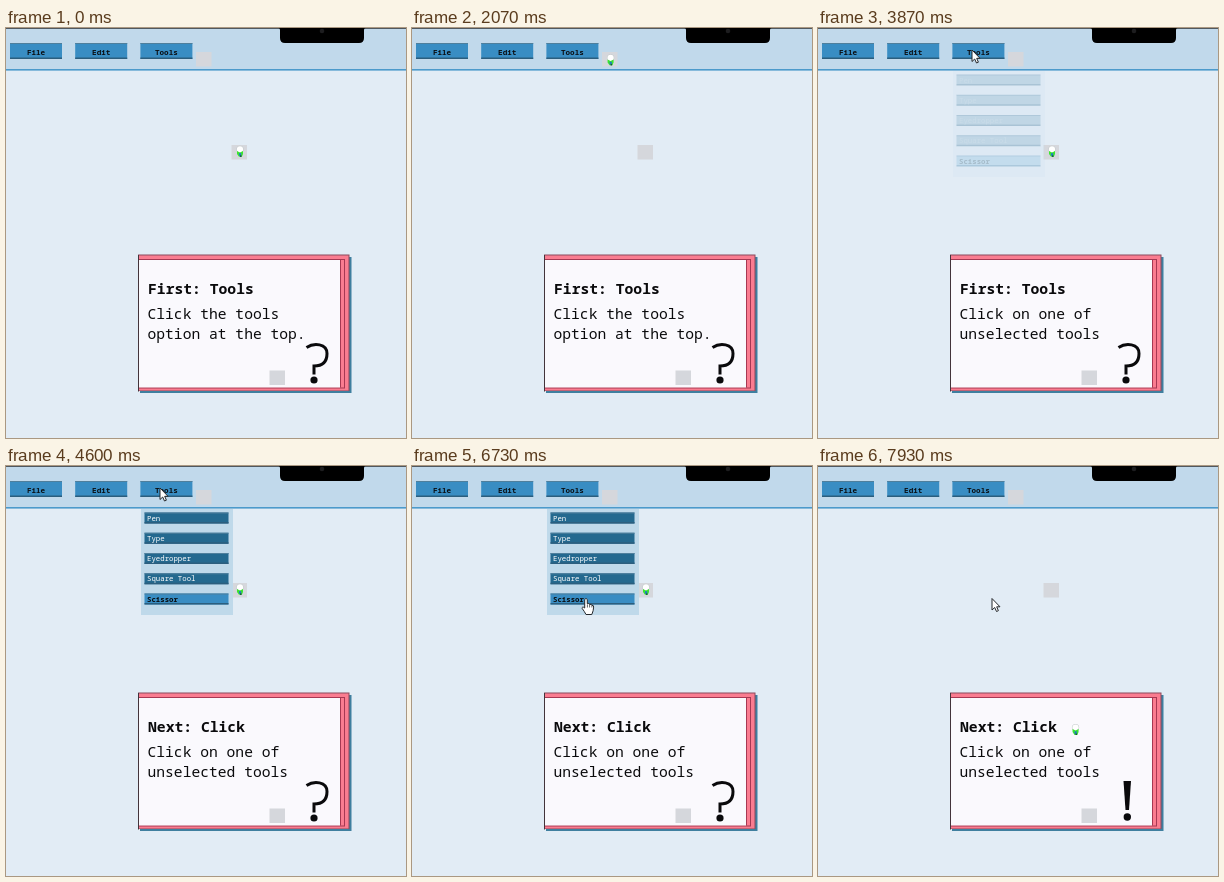
An HTML page with a canvas for the animation above (8000 ms loop, 400 px wide and 410 px high).

```html
<!DOCTYPE html>
<html lang="en">
<head>
<meta charset="utf-8">
<title>Tools tutorial</title>
<style>
html, body { margin: 0; width: 100%; height: 100%; overflow: hidden; background: #e2ecf5; }
canvas { display: block; width: 400px; height: 410px; }
</style>
</head>
<body>
<canvas id="stage"></canvas>
<script>
const W = 400, H = 410, LOOP = 8000;
const MONO = '"Noto Sans Mono", "DejaVu Sans Mono", monospace';
const canvas = document.getElementById('stage');
const ctx = canvas.getContext('2d');
const dpr = window.devicePixelRatio || 1;
canvas.width = W * dpr;
canvas.height = H * dpr;

// Key moments in ms
const T = {
  carry: 340, carried: 2100, enter: 2670, atTools: 3400,
  openClick: 3600, fadeIn: 3740, opened: 4270, title: 4130,
  leave: 5300, atScissor: 6250, pick: 6840, closed: 7300
};
const TOOLS = ['Pen', 'Type', 'Eyedropper', 'Square Tool', 'Scissor'];
const HOME = [234, 124], BUTTON_SLOT = [198, 31], DIALOG_SLOT = [272, 350];

const clamp = v => Math.max(0, Math.min(1, v));
const progress = (t, a, b) => clamp((t - a) / (b - a));
const smooth = u => u * u * (3 - 2 * u);
const mix = (p, q, u) => p.map((v, i) => v + (q[i] - v) * u);

function rect(x, y, w, h, color) {
  ctx.fillStyle = color;
  ctx.fillRect(x, y, w, h);
}

function text(str, x, y, size, color, weight = 400, align = 'left') {
  ctx.font = `${weight} ${size}px ${MONO}`;
  ctx.textAlign = align;
  ctx.fillStyle = color;
  ctx.fillText(str, x, y);
}

function dot(x, y, r, color) {
  ctx.fillStyle = color;
  ctx.beginPath();
  ctx.arc(x, y, r, 0, Math.PI * 2);
  ctx.fill();
}

function bar(x, y, w, h, color) {
  rect(x, y, w, h, color);
  rect(x, y, w, 1, '#4f7f9c');
  rect(x, y + h - 1.5, w, 1.5, '#2b5e7e');
}

function header() {
  rect(0, 0, W, 41, '#c1d9eb');
  rect(0, 0, W, 1, '#50585f');
  rect(0, 41, W, 1.6, '#4c9acb');
  ['File', 'Edit', 'Tools'].forEach((name, i) => {
    const x = 4 + i * 65.2;
    bar(x, 15, 52, 16, '#398dc3');
    text(name, x + 26, 26.6, 7.6, '#0b1015', 700, 'center');
  });
  ctx.fillStyle = '#000';
  ctx.beginPath();
  ctx.moveTo(272.5, 0);
  ctx.quadraticCurveTo(274, 0, 274, 2);
  ctx.lineTo(274, 10);
  ctx.quadraticCurveTo(274, 15, 279, 15);
  ctx.lineTo(353, 15);
  ctx.quadraticCurveTo(358, 15, 358, 10);
  ctx.lineTo(358, 2);
  ctx.quadraticCurveTo(358, 0, 359.5, 0);
  ctx.fill();
  dot(316, 3, 2.3, '#1d1d1f');
}

function slots() {
  rect(190, 24, 15.5, 14.5, '#d5d7dc');
  rect(225.5, 117, 15.5, 14.5, '#d5d7dc');
}

function menu(alpha) {
  if (alpha <= 0) return;
  ctx.globalAlpha = alpha;
  rect(135, 43, 92, 106, '#bfd9ea');
  TOOLS.forEach((name, i) => {
    const y = 46.5 + i * 20.25;
    const open = i === TOOLS.length - 1;
    bar(138.5, y, 84, 11, open ? '#398dc3' : '#24698f');
    text(name, 141, y + 8.1, 7.35, open ? '#080b0e' : '#fff', open ? 600 : 500);
  });
  ctx.globalAlpha = 1;
}

function question() {
  ctx.strokeStyle = '#0a0a0c';
  ctx.lineWidth = 3;
  ctx.beginPath();
  ctx.moveTo(300.5, 319.5);
  ctx.bezierCurveTo(308, 314.5, 321, 315.5, 321, 325.5);
  ctx.bezierCurveTo(321, 334, 316, 338, 308, 338);
  ctx.lineTo(308, 346.5);
  ctx.stroke();
  dot(308, 352, 3.6, '#0a0a0c');
}

function exclamation() {
  polygon([[305.5, 315], [313, 315], [311, 344], [307.5, 344]], '#0a0a0c');
  dot(309.3, 351, 3.7, '#0a0a0c');
}

function dialog(t) {
  rect(134, 229, 211.5, 136, '#3f7f9f');
  rect(132, 226.5, 211.5, 136.5, '#8b4b5d');
  rect(132, 227.5, 210.5, 135, '#fa7c90');
  rect(132, 231, 207, 129.5, '#a63852');
  rect(132, 232, 206, 127.5, '#fa7c90');
  rect(132, 232, 203, 127.5, '#a63852');
  rect(132, 232, 202, 127.5, '#faf9fd');
  rect(132, 227, 1, 136.5, '#43343b');
  rect(263.5, 342.5, 15.5, 14.5, '#d5d7dc');

  text(t < T.title ? 'First: Tools' : 'Next: Click', 142, 265.5, 14.7, '#0a0a0c', 700);
  const lines = t < T.openClick
    ? ['Click the tools', 'option at the top.']
    : ['Click on one of', 'unselected tools'];
  lines.forEach((line, i) => text(line, 141.5, 291 + i * 19.5, 14.65, '#0a0a0c'));
  if (t < T.pick) question();
  else exclamation();
}

function polygon(points, fill, stroke) {
  ctx.beginPath();
  points.forEach(([x, y]) => ctx.lineTo(x, y));
  ctx.closePath();
  ctx.fillStyle = fill;
  ctx.fill();
  if (stroke) {
    ctx.strokeStyle = stroke;
    ctx.lineWidth = 1;
    ctx.stroke();
  }
}

function carrier(t) {
  let pos = HOME;
  if (t < T.carried) pos = mix(HOME, BUTTON_SLOT, progress(t, T.carry, T.carried));
  if (t >= T.pick) pos = mix(HOME, DIALOG_SLOT, progress(t, T.pick, T.pick + T.carried - T.carry));
  ctx.save();
  ctx.translate(...pos);
  dot(0, -2.6, 3.6, '#c3c9cb');
  dot(0, -2.6, 3.1, '#fff');
  polygon([[-3, -1], [0, 0.5], [3, -1], [3, 2], [1.8, 4.8], [-1, 4.8], [-3, 2]], '#3be52f');
  rect(-1, 1.2, 2.2, 2.6, '#2179c4');
  rect(0, 3.4, 1.5, 1.5, '#174d42');
  ctx.restore();
}

function arrow() {
  polygon([[0, 0], [0, 11.5], [2.7, 9], [4.5, 13], [6.4, 12.2], [4.7, 8.3], [8, 8.3]], '#fff', '#25282c');
}

function hand() {
  ctx.beginPath();
  ctx.moveTo(-1.3, 9.5);
  ctx.lineTo(-1.3, 1);
  ctx.quadraticCurveTo(0, -1.2, 1.3, 1);
  ctx.lineTo(1.3, 5.3);
  ctx.quadraticCurveTo(3, 4.4, 3.8, 6);
  ctx.quadraticCurveTo(5.4, 5.2, 6, 6.8);
  ctx.quadraticCurveTo(7.8, 6.5, 7.6, 8.6);
  ctx.quadraticCurveTo(7.6, 12, 5.8, 16);
  ctx.lineTo(0, 16);
  ctx.quadraticCurveTo(-1.5, 13, -3.8, 10);
  ctx.quadraticCurveTo(-4, 7.4, -1.3, 9.5);
  ctx.closePath();
  ctx.fillStyle = '#fff';
  ctx.fill();
  ctx.strokeStyle = '#25282c';
  ctx.lineWidth = 1;
  ctx.stroke();
  for (const x of [1.3, 3.7, 5.9]) rect(x - 0.35, 6, 0.7, 3, '#25282c');
}

function pointerAt(t) {
  const start = [305, 248], bend = [194, 183], tools = [154, 22];
  if (t < T.atTools) {
    const u = 1 - Math.pow(1 - progress(t, T.enter, T.atTools), 1.35);
    return mix(mix(start, bend, u), mix(bend, tools, u), u);
  }
  return mix(tools, [174, 132.5], smooth(progress(t, T.leave, T.atScissor)));
}

function pointer(t) {
  if (t < T.enter) return;
  const pos = pointerAt(t);
  const overScissor = t > T.leave && t < T.closed && pos[1] >= 127.5;
  ctx.save();
  ctx.translate(...pos);
  if (overScissor) hand();
  else arrow();
  ctx.restore();
}

function draw(t) {
  ctx.setTransform(dpr, 0, 0, dpr, 0, 0);
  rect(0, 0, W, H, '#e2ecf5');
  header();
  slots();
  menu(smooth(progress(t, T.fadeIn, T.opened)) * (1 - smooth(progress(t, T.pick, T.closed))));
  dialog(t);
  carrier(t);
  pointer(t);
}

const begin = performance.now();
function tick() {
  draw((performance.now() - begin) % LOOP);
  requestAnimationFrame(tick);
}
tick();
</script>
</body>
</html>
```
